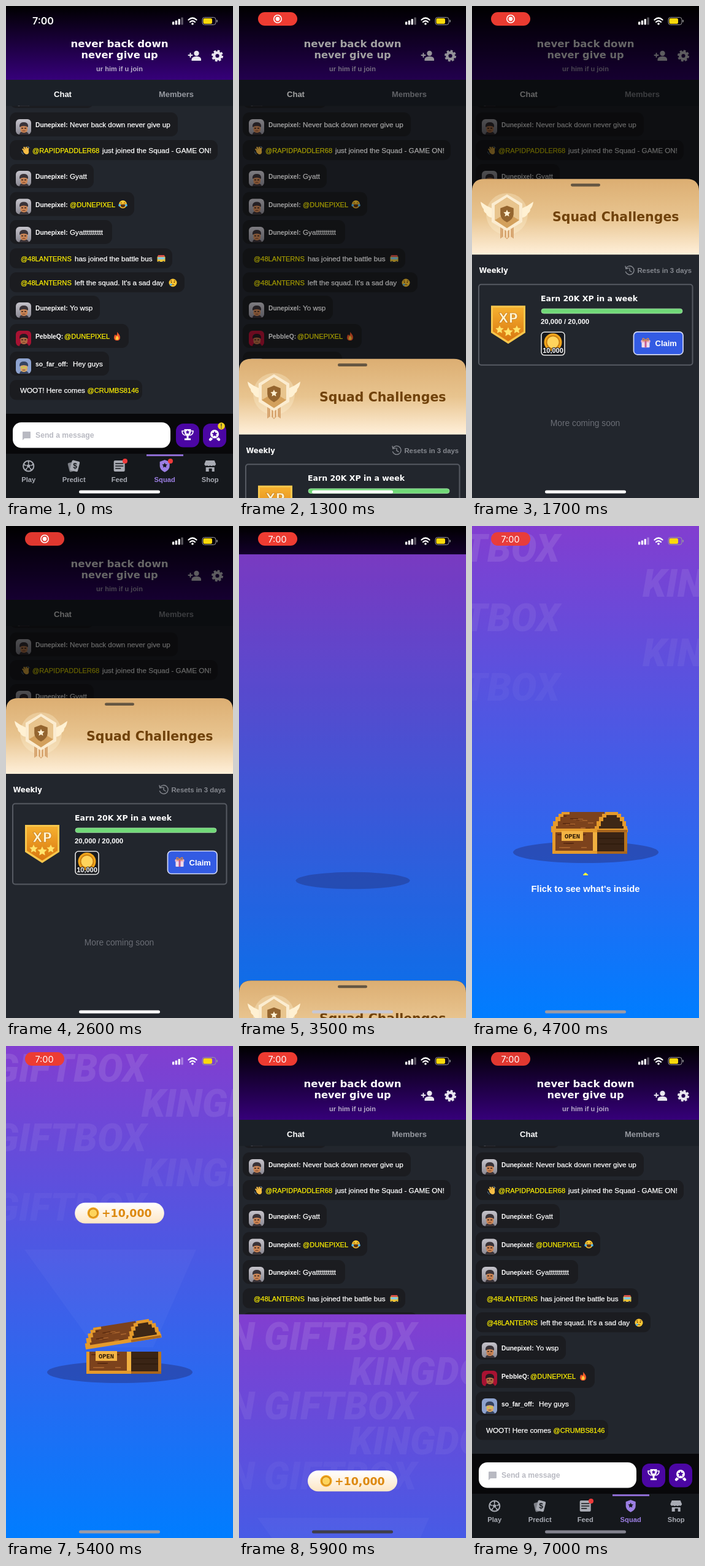
These frames come from a looping animation (370x800 px, 7100 ms). An HTML page:

```html
<!DOCTYPE html>
<html lang="en">
<head>
<meta charset="utf-8">
<title>Squad challenge reward</title>
<style>
  html, body { margin: 0; width: 100%; height: 100%; overflow: hidden; background: #000; }
  svg { display: block; width: 100%; height: 100%; }
  text { font-family: "Liberation Sans", Arial, sans-serif; font-size: 11.7px; fill: #fff; white-space: pre; }
  .b { font-weight: bold; }
  .wide { font-family: "DejaVu Sans", sans-serif; font-weight: bold; }
  .mid { text-anchor: middle; }
  .say { stroke: #fff; stroke-width: .25; }
  .at { fill: #fdf000; stroke: #fdf000; font-size: 11.1px; }
  .clock { font-family: Inter, sans-serif; }
  .banner { font: italic 900 62px Roboto, sans-serif; font-stretch: 75%; }
</style>
</head>
<body>
<svg id="stage" viewBox="0 0 370 800"></svg>
<script>
const rect = (x, y, w, h, r, fill, extra = '') =>
  `<rect x="${x}" y="${y}" width="${w}" height="${h}" rx="${r}" fill="${fill}" ${extra}/>`;
const circle = (x, y, r, fill, extra = '') => `<circle cx="${x}" cy="${y}" r="${r}" fill="${fill}" ${extra}/>`;
const path = (d, fill, extra = '') => `<path d="${d}" fill="${fill}" ${extra}/>`;
const line = (d, stroke, width = 1.5, extra = '') =>
  path(d, 'none', `stroke="${stroke}" stroke-width="${width}" stroke-linecap="round" ${extra}`);
const text = (x, y, s, cls = '', style = '') => `<text x="${x}" y="${y}" class="${cls}" style="${style}">${s}</text>`;
const group = (x, y, body, id = '') => `<g ${id && `id="${id}"`} transform="translate(${x} ${y})">${body}</g>`;
const fade = (id, ...colors) => `<linearGradient id="${id}" x2="0" y2="1">${colors.map((c, i) =>
  `<stop offset="${i / (colors.length - 1)}" stop-color="${c}"/>`).join('')}</linearGradient>`;
const star = (x, y, r, fill) => {
  const pts = Array.from({ length: 10 }, (_, i) => {
    const a = i * Math.PI / 5, k = i % 2 ? r * .48 : r;
    return `${(x + k * Math.sin(a)).toFixed(1)},${(y - k * Math.cos(a)).toFixed(1)}`;
  });
  return `<polygon points="${pts.join(' ')}" fill="${fill}"/>`;
};
const coin = (x, y, r) => circle(x, y, r, '#f0a51c') +
  circle(x, y, r * .72, '#ffd45c', `stroke="#c97c10" stroke-width="${r * .12}"`);

// Small pictures, centred on 0,0
const face = circle(0, 0, 6.5, '#ffc933');
const emoji = {
  wave: line('M-1 2L-4.5-2M0 0L-2.5-5M2 0L1-5M3.5 1L4-3.5', '#f7bd45', 2.4) +
    path('M-3 0L4-2Q7 4 3 6Q-1 7-4 2Z', '#f7bd45') + line('M-6.5 2Q-6 5-3.5 6M3-6.5Q6-6 6.5-4', '#7ba9c9', .8),
  joy: face + path('M-4 0H4Q4 5 0 5T-4 0Z', '#5b3212') + line('M-4-2Q-3-4-1.5-2M1.5-2Q3-4 4-2', '#5b3212', 1) +
    circle(-5.3, 1.5, 2, '#4db4ee') + circle(5.3, 1.5, 2, '#4db4ee'),
  bus: rect(-6.5, -4, 13, 9, 1.5, '#e9c33c') + rect(-5.5, -6, 11, 3, 1, '#d95148') +
    rect(-5.5, -2.5, 11, 3.5, .5, '#7fc9e6') + circle(-3.5, 5, 1.6, '#333') + circle(3.5, 5, 1.6, '#333'),
  cry: face + circle(-2.3, -1, 1, '#5b3212') + circle(2.3, -1, 1, '#5b3212') +
    line('M-2 3.5Q0 1.5 2 3.5M-4-3L-2-4M4-3L2-4', '#5b3212', .9) + circle(-3.2, 3, 1.8, '#4db4ee'),
  fire: path('M0-7Q5-2 5 2Q5 7 0 7T-5 2Q-5-1-3-3Q-2-1-1-1Q1-4 0-7Z', '#f4592b') +
    path('M0-1Q3 2 2.5 4Q2 6 0 6T-2.5 4Q-2 1 0-1Z', '#ffce3d')
};
const avatarColors = {
  grey: ['url(#avatar)', '#3a3338', '#c98455'],
  red: ['#a81232', '#241a20', '#b06a42'],
  blue: ['#8ea3cf', '#36435f', '#d9a86a']
};
function avatar(x, y, kind) {
  const [bg, hat, skin] = avatarColors[kind];
  const eyes = kind == 'blue' ? '#b7e52f' : '#33221c';
  return group(x, y, rect(0, 0, 25, 25, 6, bg) + path('M6 25Q6 20 13 20T21 25Z', hat) +
    rect(7.5, 8, 11.5, 14, 5, skin) + path('M6 13V10Q7 5 13 5T20 10V13Q13 9 6 13Z', hat) +
    rect(9, 14, 3, 1.5, .5, eyes) + rect(14, 14, 3, 1.5, .5, eyes) + line('M11 19H15', '#6d3823', 1));
}

// [top, width, sender, avatar, [[x, text, is mention]...], [emoji, x]]
const me = 'Dunepixel:';
const messages = [
  [127, 137, me, 'grey', [[104, 'Hey']]],
  [173, 274, me, 'grey', [[104, 'Never back down never give up']]],
  [218, 339, '', '', [[43, '@RAPIDPADDLER68', 1], [157, 'just joined the Squad - GAME ON!']], ['wave', 32]],
  [257, 137, me, 'grey', [[104, 'Gyatt']]],
  [302.5, 203, me, 'grey', [[104, '@DUNEPIXEL', 1]], ['joy', 190.5]],
  [348, 167, me, 'grey', [[104, 'Gyatttttttttt']]],
  [394, 265, '', '', [[24, '@48LANTERNS', 1], [112, 'has joined the battle bus']], ['bus', 253]],
  [433, 285, '', '', [[24, '@48LANTERNS', 1], [112, "left the squad. It's a sad day"]], ['cry', 272]],
  [471, 147, me, 'grey', [[104, 'Yo wsp']]],
  [517, 194, 'PebbleQ:', 'red', [[95, '@DUNEPIXEL', 1]], ['fire', 181]],
  [562, 162, 'so_far_off:', 'blue', [[109, 'Hey guys']]],
  [608, 216, '', '', [[23, 'WOOT! Here comes'], [132.5, '@CRUMBS8146', 1]]]
];
function message([y, w, sender, kind, parts, icon]) {
  const base = y + (sender ? 24 : 21);
  return rect(6, y, w, sender ? 39 : 32.5, 11, '#1b1c20') +
    (sender ? avatar(16, y + 11, kind) + text(48, base, sender, 'b', 'font-size:10.3px') : '') +
    parts.map(([x, s, mention]) => text(x, base, s, mention ? 'say at' : 'say')).join('') +
    (icon ? group(icon[1], base - 4, emoji[icon[0]]) : '');
}

const shield = (fill) => path('M0-10L8-7V0Q8 6 0 10Q-8 6-8 0V-7Z', fill);
const tabs = [
  ['Play', c => circle(0, 0, 8.6, 'none', `stroke="${c}" stroke-width="2"`) + star(0, 0, 4.5, c) +
    line('M0-8V-5M8-3L5-1M-8-3L-5-1M5 7L3 4M-5 7L-3 4', c, 2)],
  ['Predict', c => rect(-9, -7, 11, 15, 2, c, 'transform="rotate(-14)" opacity=".7"') +
    rect(-5, -9, 13, 17, 2, c, 'transform="rotate(14)"') + text(2, 4, '$', 'b mid', 'fill:#15181c;font-size:12px')],
  ['Feed', c => rect(-9, -9, 18, 18, 2, c) + line('M-6-4H6M-6 0H6M-6 4H2', '#15181c')],
  ['Squad', c => shield(c) + star(0, -1, 4.5, '#15181c')],
  ['Shop', c => path('M-7-9H7L9.5-3Q8 1 5-1Q2 1 0-1Q-2 1-5-1Q-8 1-9.5-3Z', c) + path('M-7 2H7V9H3V4H-2V9H-7Z', c)]
];
const nav = tabs.map(([name, icon], i) => {
  const x = 36.7 + 74 * i, c = i == 3 ? '#9c7fe3' : '#a8abb3';
  return group(x, 748, icon(c)) + text(x, 774, name, 'b mid', `fill:${c};font-size:11.2px`);
}).join('');

const gear = circle(0, 0, 5.3, 'none', 'stroke="#e9e6ef" stroke-width="4.4"') +
  circle(0, 0, 8, 'none', 'stroke="#e9e6ef" stroke-width="3" stroke-dasharray="3.6 2.683"');
const chat = rect(0, 0, 370, 800, 0, '#22262d') + messages.map(message).join('') +
  rect(0, 0, 370, 120, 0, 'url(#header)') + rect(0, 120, 370, 42.5, 0, '#1b2027') +
  text(185, 67, 'never back down', 'wide mid', 'font-size:16.6px') +
  text(185, 85, 'never give up', 'wide mid', 'font-size:16.2px') +
  text(185, 106, 'ur him if u join', 'b mid', 'font-size:11px;fill:#b8acca') +
  group(307, 81, circle(3.5, -4, 4.2, '#e9e6ef') + path('M-4.5 8V5Q-3 1 3.5 1T11 5V8Z', '#e9e6ef') +
    line('M-9.5-1H-3.5M-6.5-4V2', '#e9e6ef', 2)) + group(344.5, 81, gear) +
  text(92.5, 148, 'Chat', 'b mid', 'font-size:13px') +
  text(277.5, 148, 'Members', 'b mid', 'font-size:13px;fill:#9699a0') +
  rect(0, 663, 370, 66, 0, '#08080a') + rect(0, 728, 370, 72, 0, '#15181c') + rect(229, 729, 60, 3, 0, '#8c6bd0') +
  rect(11, 677, 257, 41.5, 14, '#fff') + text(48, 702, 'Send a message', 'b', 'font-size:12.2px;fill:#b9bac2') +
  path('M28 692H39Q40 692 40 693V702Q40 703 39 703H30L27 706V693Q27 692 28 692Z', '#b9bac2') +
  rect(277, 679, 38, 38.5, 12, '#4b06a3') + rect(321, 679, 38, 38.5, 12, '#4b06a3') +
  group(296, 698, path('M-5.5-10H5.5Q6 0 0 2Q-6 0-5.5-10ZM-1.5 1H1.5V5H5V8H-5V5H-1.5Z', '#fff') +
    line('M-6-7H-9Q-9-1-4 0M6-7H9Q9-1 4 0', '#fff', 1.6) + star(0, -5, 3.5, '#4b06a3')) +
  group(340, 698, line('M-4 4L-7 7M4 4L7 7', '#fff', 4.5) + circle(0, -2, 8.3, '#4b06a3') +
    circle(0, -2, 6, '#fff', 'stroke="#fff" stroke-width="2"') + star(0, -2, 5, '#4b06a3')) +
  nav + circle(194, 740, 4, '#ee3b3b') +
  `<g id="badges">${circle(268, 740, 4, '#ee3b3b') + circle(351, 683, 5.8, '#f2d31d') +
    text(351, 686.5, '!', 'b mid', 'font-size:10px;fill:#333')}</g>`;

const wing = path('M-24-9Q-34-13-43-20Q-42-12-38-8Q-38-3-34-1Q-32 5-24 6Z', '#fff1d3');
const emblem = circle(0, 0, 34, '#fff3d8', 'opacity=".3"') + wing + `<g transform="scale(-1 1)">${wing}</g>` +
  path('M-11 18H11V40L5 36L0 41L-5 36L-11 40Z', '#d9a873') + line('M-5 22V36M0 22V38M5 22V36', '#fbe6c6', 2) +
  path('M0-32L25-17V13L0 28L-25 13V-17Z', '#fbecd0') + path('M0-27L20-14V10L0 23L-20 10V-14Z', '#d3a05c') +
  path('M0-27L20-14V10L0-2L-20 10V-14Z', '#e8c48d') + `<g transform="scale(1.35)">${shield('#94652f')}</g>` +
  star(0, -1, 6, '#fff0d2');
const xpBadge = path('M31 206H87V250L59 268L31 250Z', '#f7c64c') + path('M34 209H84V248L59 264L34 248Z', 'url(#xp)') +
  text(59, 234, 'XP', 'wide mid', 'font-size:21px;fill:#fff4cf;stroke:#b9690f;stroke-width:.6') +
  star(45, 245, 7, '#ffe36b') + star(59, 249, 8, '#ffe36b') + star(73, 245, 7, '#ffe36b');
const sheet = path('M0 800V20Q0 0 20 0H350Q370 0 370 20V800Z', '#22262d') +
  path('M0 123V20Q0 0 20 0H350Q370 0 370 20V123Z', 'url(#gold)') + rect(161, 7.5, 48, 4.6, 2.3, '#655642') +
  group(57, 57, emblem) + text(131, 69, 'Squad Challenges', 'wide', 'font-size:20.5px;fill:#70420b') +
  text(11.5, 153, 'Weekly', 'wide', 'font-size:11.6px') +
  text(358, 153, 'Resets in 3 days', 'b', 'font-size:11.3px;fill:#85888f;text-anchor:end') +
  line('M251 145A7 7 0 1 1 250.5 151M250 142L251 146L255 145M257 145V149L260 151', '#85888f', 1.4) +
  rect(11, 171.5, 348.5, 131, 4, 'none', 'stroke="#565a62" stroke-width="2"') + xpBadge +
  text(112, 198.5, 'Earn 20K XP in a week', 'wide', 'font-size:12.5px') +
  rect(113, 211, 230, 7.6, 3.8, '#71d978', 'stroke="#a5dca9" stroke-width=".8"') +
  text(112, 235.5, '20,000 / 20,000', 'b', 'font-size:11.4px') +
  rect(113, 249, 38, 37.5, 5, '#17191e', 'stroke="#e4e4e4" stroke-width="1.6"') + coin(132, 265.5, 14.5) +
  text(132, 283, '10,000', 'b mid', 'font-size:11px;stroke:#17191e;stroke-width:2;paint-order:stroke') +
  rect(263.5, 248.5, 80.5, 37, 6, '#335be3', 'stroke="#d4daf5" stroke-width="1.7"') +
  group(283, 267, rect(-6.5, -2, 13, 9, 1, '#f0dcec') + rect(-7.5, -5, 15, 4, 1, '#e8b6cd') +
    rect(-1.5, -5, 3, 12, 0, '#c45c94') + line('M0-5Q-5-10-5-6T0-5Q5-10 5-6T0-5', '#e0883f', 1.5)) +
  text(298.5, 272, 'Claim', 'b', 'font-size:13px') +
  text(184.5, 402, 'More coming soon', 'mid', 'font-size:13.8px;fill:#6a6d75');

// Chest: wood grain strips follow a short rule
const grain = (x, y, w, h, n) => Array.from({ length: n }, (_, i) =>
  rect(x + (i * 29) % (w - 16), y + (i * 7) % h, 8 + (i * 5) % 9, 1.6, 0, i % 2 ? '#a9642e' : '#58290f')).join('');
const lid = path('M131 497V488H134V480H138V473H143V468H148V465H216V497Z', '#7c421c') + grain(146, 471, 62, 22, 12) +
  path('M200 497V488H203V480H207V473H212V468H217V465H238V468H243V473H248V480H251V488H253V497Z', '#e59a2b') +
  path('M207 497V488H210V480H214V474H219V470H236V474H241V480H245V488H247V497Z', '#3e2716') +
  path('M129 497V488H132V480H136V473H141V468H146V465H159V469H149V473H144V480H140V488H137V497Z', '#e59a2b') +
  rect(129, 492, 125, 6, 0, '#e59a2b') + rect(204, 494, 49, 4, 0, '#a9661d');
const chest = rect(131, 497, 72, 35, 0, '#7c421c') + grain(139, 501, 56, 28, 14) + rect(203, 497, 50, 35, 0, '#3a2415') +
  line('M207 508H247M207 517H247', '#291708', 1.2) + rect(131, 497, 5, 36, 0, '#e59a2b') +
  rect(197, 497, 7, 36, 0, '#f0b040') + rect(248, 497, 5, 36, 0, '#b8741f') + rect(131, 528, 73, 5, 0, '#e59a2b') +
  rect(204, 529, 49, 4, 0, '#a9661d') + `<g id="lid">${lid}</g>` + rect(146, 496, 35, 16, 0, '#f3b444') +
  text(163.5, 507.5, 'OPEN', 'b mid', 'font:bold 10.5px &quot;Liberation Mono&quot;,monospace;fill:#2d1a08');
const banners = [0, 1, 2, 3, 4].map(i => text(0, 58 + 56.6 * i, 'KINGDOM OPEN GIFTBOX', 'banner',
  `opacity:${.1 - .016 * i};text-anchor:${i % 2 ? 'start' : 'end'}`)).join('');
const loot = rect(0, 0, 370, 800, 0, 'url(#loot)') + banners +
  `<ellipse id="shadow" cx="185.5" cy="530.5" fill="#24307c"/>` +
  path('M145 490L30 331H310L240 490Z', '#fff', 'id="glow"') + `<g id="chest">${chest}</g>` +
  `<g id="hint">${path('M181 568Q181 566 185 563.5Q189 566 189.5 568Z', '#fdf53a', 'id="arrow"') +
    text(185, 595, "Flick to see what's inside", 'b mid', 'font-size:14.8px')}</g>` +
  `<g id="reward">${rect(-73, -17, 146, 34, 17, 'url(#pill)') + coin(-43, 0, 9.5) +
    text(-29, 6.3, '+10,000', 'wide', 'font-size:17.4px;fill:#dd890f')}</g>`;

const status = `<g id="record">${rect(31, 10, 64, 22, 11, '#ee3c32')}</g>` +
  text(43, 30, '7:00', 'clock', 'font-size:16px;font-weight:600') +
  `<g id="dot">${circle(63, 21, 6.2, 'none', 'stroke="#fff" stroke-width="1.6"') + circle(63, 21, 3.4, '#fff')}</g>` +
  text(62.5, 26.5, '7:00', 'clock mid', 'font-size:14.5px') +
  [5, 7, 9.5, 12].map((h, i) => rect(271 + 4.8 * i, 30.5 - h, 3.3, h, 1, '#fff', i == 3 ? 'opacity=".35"' : '')).join('') +
  line('M297.5 22.5Q304 16.5 310.5 22.5M300 26Q304 22.5 308 26', '#fff', 2.3) + circle(304, 29, 1.8, '#fff') +
  rect(320, 18.5, 22, 12, 3.6, 'none', 'stroke="#9a9a9a"') + rect(321.5, 20, 14.5, 9, 2.2, '#fbd90b') +
  rect(343.3, 22.5, 1.5, 4, .7, '#9a9a9a') + rect(119, 787.5, 132, 5, 2.5, '#fff', 'id="home"');

const stage = document.getElementById('stage');
stage.innerHTML = `<defs>${fade('header', '#000', '#36007a') + fade('gold', '#dcae72', '#e8c48f', '#fff0da') +
  fade('xp', '#f6b02f', '#d8760f') + fade('loot', '#823ed0', '#007dff') + fade('pill', '#fff', '#fde6c4') +
  fade('avatar', '#c5c3ca', '#8b8993')}</defs>` + group(0, 0, chat) + group(0, 800, loot, 'loot-view') +
  rect(0, 0, 370, 800, 0, '#000', 'id="dim"') + group(0, 800, sheet, 'sheet') + status;

const $ = id => document.getElementById(id);
const move = (el, x, y, more = '') => el.setAttribute('transform', `translate(${x} ${y}) ${more}`);
const show = (el, opacity) => el.setAttribute('opacity', opacity);
const part = (t, start, length) => Math.min(1, Math.max(0, (t - start) / length));
const slide = (t, start) => { const u = part(t, start, 510); return u < 1 ? 1 - 2 ** (-10 * u) : 1; };
const easeOut = u => 1 - (1 - u) ** 3;
function track(t, keys) {
  const i = keys.findIndex(k => k[0] > t);
  const [t0, v0] = keys[i - 1], [t1, v1] = keys[i];
  return v0 + (v1 - v0) * (t - t0) / (t1 - t0);
}
const homeGrey = [[0, 255], [3300, 255], [3500, 200], [4000, 155], [5700, 155], [5900, 62], [6400, 130], [7101, 130]];
const rows = document.querySelectorAll('.banner');
const [bigClock, pillClock] = document.querySelectorAll('.clock');

function draw(t) {
  const opened = slide(t, 1258), closed = slide(t, 3342);
  move($('sheet'), 0, 800 - 520 * (opened - closed));
  show($('dim'), Math.max(0, .6 * (opened ** .6 - closed)));
  move($('loot-view'), 0, 800 * (1 - slide(t, 3290) + slide(t, 5842)));
  show($('badges'), t < 3300 ? 1 : 0);

  const fall = part(t, 3900, 350) ** 2, size = .785 + .215 * fall;
  $('shadow').setAttribute('rx', 118.5 * size);
  $('shadow').setAttribute('ry', 17.5 * size);
  show($('shadow'), .4 + .08 * fall);
  const bounce = 14 * Math.sin(Math.PI * part(t, 4250, 200));
  show($('chest'), t > 3900 ? 1 : 0);
  move($('chest'), 0, -560 * (1 - fall) - bounce);
  show($('hint'), part(t, 4350, 200) * (1 - part(t, 4950, 100)));
  move($('arrow'), 0, 3 * Math.sin((t - 4700) / 400 * Math.PI));

  const lift = easeOut(part(t, 5000, 200)), rise = easeOut(part(t, 5100, 350));
  move($('lid'), 0, -14 * lift, `rotate(${-9 * lift} 190 495)`);
  show($('glow'), .03 * lift);
  show($('reward'), part(t, 5100, 100));
  move($('reward'), 185, 490 - 219 * rise, `scale(${.2 + .8 * rise})`);
  rows.forEach((row, i) => row.setAttribute('x', i % 2 ? 278 - (t - 4700) * .0817 : 143 + (t - 4700) * .122));

  const recording = part(t, 200, 300);
  show($('record'), recording * (.97 + .03 * Math.cos((t - 1300) / 1100 * Math.PI)));
  show(bigClock, 1 - recording);
  show($('dot'), t < 3100 ? recording : 0);
  show(pillClock, t < 3100 ? 0 : 1);
  const grey = track(t, homeGrey);
  $('home').setAttribute('fill', `rgb(${grey} ${grey} ${Math.min(255, grey + 12)})`);
}

// The picture advances in steps of 100 ms
const begin = performance.now();
function tick() {
  draw(Math.floor((performance.now() - begin) % 7100 / 100) * 100);
  requestAnimationFrame(tick);
}
tick();
</script>
</body>
</html>
```
